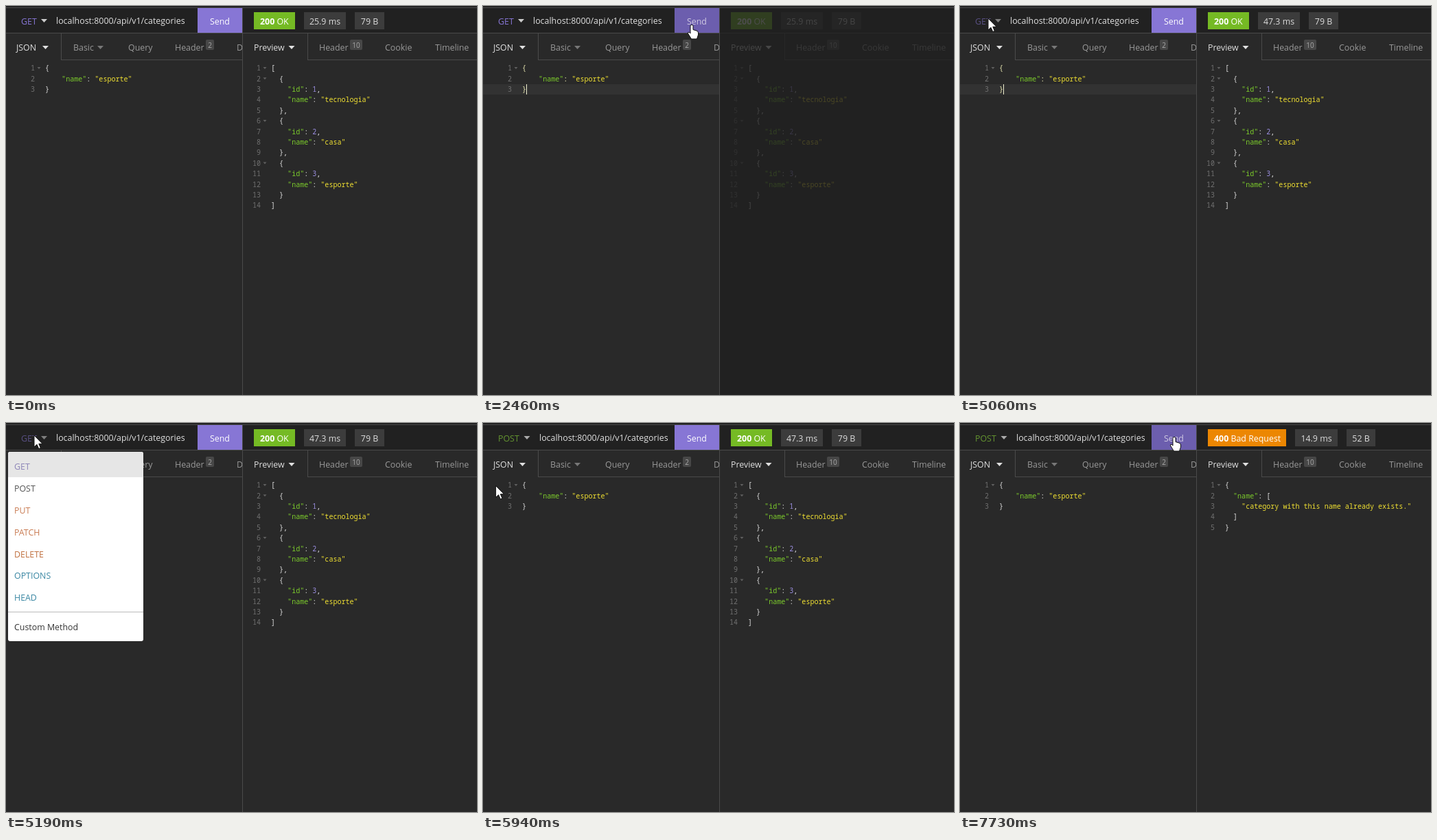
These frames come from a looping animation (686x567 px, 7990 ms). An HTML page with a canvas:

```html
<!DOCTYPE html>
<html lang="en">
<head>
<meta charset="utf-8">
<title>API client</title>
<style>
  html, body { margin: 0; width: 100%; height: 100%; overflow: hidden; background: #292929; }
  canvas { display: block; }
</style>
</head>
<body>
<canvas id="stage" width="686" height="567"></canvas>
<script>
const ctx = document.getElementById('stage').getContext('2d');
const LOOP = 7990;
const SANS = '12.4px "Open Sans", "Noto Sans", sans-serif';
const MONO = '10.05px "Noto Sans Mono", "DejaVu Sans Mono", monospace';
const LINE = '#4a4a4a', LIGHT = '#e0e0e0', GREY = '#999';
const ROW = 15.4;

const OPEN = 5190, PICK = 5940;      // method menu shown and item chosen
const FOCUS = 2450;                  // body editor gets the caret

// Mouse path: time, x, y
const PATH = [
  [70, 340, 560], [300, 270, 400], [560, 400, 195], [820, 530, 290],
  [1000, 564, 250], [1230, 350, 58], [1400, 126, 190], [1670, 452, 322],
  [1740, 430, 290], [1880, 275, 48], [2080, 302, 31], [2200, 304, 27],
  [3480, 304, 27], [3680, 368, 158], [3850, 392, 255], [4160, 330, 200],
  [4430, 325, 190], [4750, 130, 60], [5000, 41, 18], [5200, 41, 18],
  [5530, 76, 82], [5800, 20, 90], [6000, 18, 92], [6350, 140, 138],
  [6850, 311, 35], [7000, 312, 20]
];

const BODY = ['{', '    "name": "esporte"', '}'];
const ITEMS = ['tecnologia', 'casa', 'esporte'];
const LIST = JSON.stringify(ITEMS.map((name, i) => ({ id: i + 1, name })), null, 2).split('\n');
const ERROR = JSON.stringify({ name: ['category with this name already exists.'] }, null, 2).split('\n');
const MENU = [
  ['GET', 63, '#8e86b8'], ['POST', 95, '#555'], ['PUT', 127, '#c97b52'],
  ['PATCH', 159, '#c97b52'], ['DELETE', 191, '#c0703f'], ['OPTIONS', 222, '#3a87a3'],
  ['HEAD', 254, '#3a87a3'], ['Custom Method', 297, '#333']
];

const ramp = (t, a, b) => Math.min(1, Math.max(0, (t - a) / (b - a)));
const mix = (a, b, k) => `rgb(${a.map((v, i) => Math.round(v + (b[i] - v) * k))})`;

function rect(x, y, w, h, color) {
  ctx.fillStyle = color;
  ctx.fillRect(x, y, w, h);
}

function text(s, x, cy, color, font = SANS, align = 'left') {
  ctx.font = font;
  ctx.textAlign = align;
  ctx.fillStyle = color;
  ctx.fillText(s, x, cy + (font === MONO ? 3.7 : 4.6));
  return ctx.measureText(s).width;
}

function arrowDown(cx, cy, color, w = 9, h = 5) {
  ctx.fillStyle = color;
  ctx.beginPath();
  ctx.moveTo(cx - w / 2, cy - h / 2);
  ctx.lineTo(cx + w / 2, cy - h / 2);
  ctx.lineTo(cx, cy + h / 2);
  ctx.fill();
}

function badge(s, x, w) {
  ctx.fillStyle = '#474747';
  ctx.beginPath();
  ctx.roundRect(x, 49, w, 15, 2);
  ctx.fill();
  text(s, x + w / 2, 56, '#aaa', '10px "Open Sans", "Noto Sans", sans-serif', 'center');
}

function code(lines, x, numX, brace = LIGHT) {
  lines.forEach((line, i) => {
    const cy = 90.4 + i * ROW;
    text(i + 1, numX, cy, '#707070', MONO, 'right');
    if (/^\s*[{[]$/.test(line)) arrowDown(numX + 6, cy, '#606060', 5, 3);
    let left = x;
    for (const part of line.match(/"[^"]*"|\d+|[^"\d]+/g)) {
      const key = line.includes(part + ':');
      const color = part[0] === '"' ? (key ? '#7ccb2c' : '#f0e032')
        : /\d/.test(part) ? '#9b8ee0' : brace;
      left += text(part, left, cy, color, MONO);
    }
  });
}

function tabRule(x, end) {
  rect(x, 40, 1, 39, LINE);
  rect(x, 78, end - x, 1, LINE);
}

function requestPane(t, mouse) {
  const post = t >= PICK;
  const hot = mouse && mouse.x > 8 && mouse.x < 66 && mouse.y < 39;
  ctx.globalAlpha = hot ? 0.55 : 1;
  text(post ? 'POST' : 'GET', 22, 22, post ? '#649530' : '#8776d5');
  arrowDown(post ? 64 : 55.5, 21.5, post ? '#aaa' : '#ccc');
  ctx.globalAlpha = 1;
  text('localhost:8000/api/v1/categories', post ? 82 : 73, 21.5, LIGHT);

  const hover = ramp(t, 2080, 2400) - ramp(t, 3480, 3950) + ramp(t, 6750, 7100);
  rect(279, 3, 65, 36, mix([135, 118, 213], [108, 94, 174], hover));
  text('Send', 297, 22, mix([255, 255, 255], [208, 202, 226], hover));

  text('JSON', 15, 60, LIGHT);
  arrowDown(57.5, 60.5, LIGHT);
  text('Basic', 98, 60, GREY);
  arrowDown(137.5, 60.5, '#777');
  text('Query', 178, 60, GREY);
  text('Header', 246, 60, GREY);
  badge('2', 291, 12);
  ctx.save();
  ctx.beginPath();
  ctx.rect(0, 40, 344, 40);
  ctx.clip();
  text('Docs', 336, 60, GREY);
  ctx.restore();
  tabRule(80, 344);

  const focus = t >= FOCUS && t < OPEN;
  if (focus) rect(0, 114, 344, 15, '#323232');
  code(BODY, 57, 42, focus ? '#ecebb4' : LIGHT);
  if (focus && (t - FOCUS) % 1060 < 530) rect(63, 114, 1, 15, '#f0f0d0');
}

function responsePane(t) {
  const failed = t >= 7660;
  const [status, word, color, w] = failed ? ['400', ' Bad Request', '#ec8702', 114] : ['200', ' OK', '#75ba24', 60];
  rect(361, 9, w, 25, color);
  text(word, 370 + text(status, 370, 22, '#fff', 'bold ' + SANS), 22, '#fff');
  const time = failed ? '14.9 ms' : t >= 2860 ? '47.3 ms' : '25.9 ms';
  const x = 361 + w + 13, timeW = failed ? 62 : 61;
  rect(x, 9, timeW, 25, '#3c3c3c');
  text(time, x + timeW / 2, 22, '#ddd', SANS, 'center');
  const sizeX = x + timeW + 13, sizeW = failed ? 42 : 43;
  rect(sizeX, 9, sizeW, 25, '#3c3c3c');
  text(failed ? '52 B' : '79 B', sizeX + sizeW / 2, 22, '#ddd', SANS, 'center');

  text('Preview', 361, 60, LIGHT);
  arrowDown(416, 60.5, LIGHT);
  text('Header', 456, 60, GREY);
  badge('10', 501, 18);
  text('Cookie', 552, 60, GREY);
  text('Timeline', 625, 60, GREY);
  tabRule(439, 686);
  code(failed ? ERROR : LIST, 386, 371);

  // Loading veil
  const veil = t < 3000 ? ramp(t, 2080, 2440) : t < 7730 ? ramp(t, 6920, 7330) : 0;
  if (veil) rect(345, 3, 341, 564, `rgba(32,32,32,${0.8 * veil})`);
}

function methodMenu(mouse) {
  ctx.save();
  ctx.beginPath();
  ctx.roundRect(3, 42, 197, 276, 3);
  ctx.clip();
  rect(3, 42, 197, 276, '#fff');
  rect(3, 42, 197, 37, '#e6e6e6');
  if (mouse.y >= 79 && mouse.y < 111) rect(3, 79, 197, 32, '#f7f7f7');
  rect(3, 275, 197, 1, '#bbb');
  for (const [name, y, color] of MENU) text(name, 12, y, color);
  ctx.restore();
}

function mouseAt(t) {
  if (t < PATH[0][0]) return null;
  let i = PATH.findIndex(p => p[0] > t);
  if (i < 0) i = PATH.length;
  const a = PATH[i - 1], b = PATH[i] || a;
  const k = a === b ? 0 : ramp(t, a[0], b[0]);
  return { x: a[1] + (b[1] - a[1]) * k, y: a[2] + (b[2] - a[2]) * k };
}

const ARROW = new Path2D('M0 0V17L4 13.3L6.8 19.5L9.4 18.4L6.8 12.3H12Z');
const HAND = new Path2D('M-2 1.5Q0-1 2 1.5V7.5L7 9Q9.5 9.5 9.5 12V15L7.5 21H-.5L-5.5 13Q-6 10.5-3.5 11.5L-2 13Z');

function drawMouse({ x, y }) {
  const shape = x > 279 && x < 344 && y < 39 ? HAND : ARROW;
  ctx.save();
  ctx.translate(x, y);
  ctx.fillStyle = '#fff';
  ctx.strokeStyle = '#111';
  ctx.lineWidth = 1;
  ctx.fill(shape);
  ctx.stroke(shape);
  ctx.restore();
}

function draw(now) {
  const t = now % LOOP;
  const mouse = mouseAt(t);
  rect(0, 0, 686, 567, '#292929');
  rect(0, 0, 686, 39, '#212121');
  rect(0, 39, 686, 1, LINE);
  requestPane(t, mouse);
  responsePane(t);
  rect(0, 2, 686, 1, LINE);
  rect(344, 3, 1, 564, LINE);
  if (t >= OPEN && t < PICK) methodMenu(mouse);
  if (mouse) drawMouse(mouse);
  requestAnimationFrame(draw);
}
requestAnimationFrame(draw);
</script>
</body>
</html>
```
